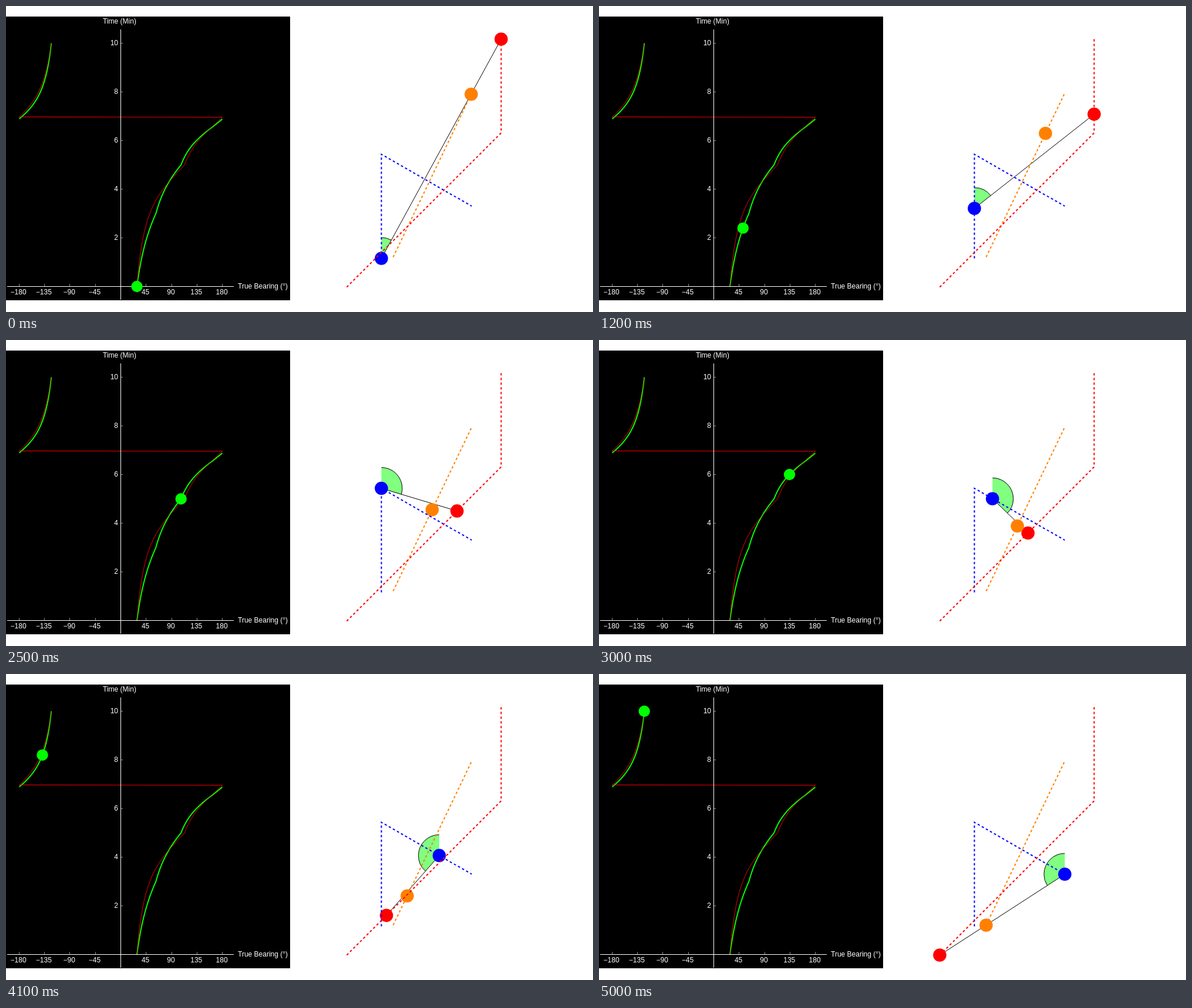
An HTML page with a canvas that plays this animation: 1000x522 px, repeating every 5100 ms.

```html
<!DOCTYPE html>
<html>
<head>
<meta charset="utf-8">
<style>
html, body { margin: 0; width: 100%; height: 100%; overflow: hidden; background: #fff; }
canvas { display: block; }
</style>
</head>
<body>
<canvas width="1000" height="522"></canvas>
<script>
const ctx = document.querySelector('canvas').getContext('2d');
const LOOP = 5100, STEP = 100, TURN = Math.PI * 2;
const RED = '#f00', BLUE = '#00f', ORANGE = '#ff8000', GREEN = '#0f0';

// Tracks: [minute, x, y]
const blue = [[0, 639.5, 430.5], [5, 639.5, 253], [10, 793.5, 341.5]];
const red = [[0, 843.5, 56.5], [3, 843.5, 216.5], [10, 580.5, 479.5]];
const orange = [[0, 792.5, 150.5], [10, 659.5, 428.5]];

function at(track, t) {
  const i = track.findIndex((p, n) => n && t <= p[0]);
  const [a, b] = [track[i - 1], track[i]];
  const k = (t - a[0]) / (b[0] - a[0]);
  return [a[1] + (b[1] - a[1]) * k, a[2] + (b[2] - a[2]) * k];
}

// Clockwise angle from north, in radians
function bearing(track, t) {
  const [x, y] = at(blue, t), [u, v] = at(track, t);
  return Math.atan2(u - x, y - v);
}

const plotX = deg => 195.5 + deg * 0.9625;
const plotY = t => 478.5 - t * 41.5;
const plot = (track, t) => [plotX(bearing(track, t) * 360 / TURN), plotY(t)];

function line(points, color, width = 1, dash = []) {
  ctx.beginPath();
  points.forEach(([x, y]) => ctx.lineTo(x, y));
  ctx.strokeStyle = color;
  ctx.lineWidth = width;
  ctx.setLineDash(dash);
  ctx.stroke();
  ctx.setLineDash([]);
}

function disk([x, y], r, color) {
  ctx.beginPath();
  ctx.arc(x, y, r, 0, TURN);
  ctx.fillStyle = color;
  ctx.fill();
}

function text(s, x, y, align) {
  ctx.font = '12px "Liberation Sans", Arial, sans-serif';
  ctx.fillStyle = '#fff';
  ctx.textAlign = align;
  ctx.fillText(s, x, y);
}

function curve(track, color, width, joinWrap) {
  let points = [];
  for (let i = 0; i <= 1000; i++) {
    const p = plot(track, i / 100);
    if (!joinWrap && points.length && p[0] < points.at(-1)[0] - 100) {
      line(points, color, width);
      points = [];
    }
    points.push(p);
  }
  line(points, color, width);
}

function drawGraph(t) {
  ctx.fillStyle = '#000';
  ctx.fillRect(0, 18, 484, 484);
  curve(orange, '#e00000', 0.9, true);
  curve(red, GREEN, 2, false);
  ctx.globalAlpha = 0.75;
  curve(orange, '#e00000', 0.9, true);
  ctx.globalAlpha = 1;

  for (let d = -180; d <= 180; d += 45) {
    if (!d) continue;
    const x = Math.floor(plotX(d)) + 0.5;
    line([[x, 478], [x, 474]], '#888');
    text(String(d).replace('-', '−'), plotX(d) - 1.2, 492, 'center');
  }
  for (let m = 2; m <= 10; m += 2) {
    line([[196, plotY(m)], [199, plotY(m)]], '#888');
    text(m, 191, plotY(m) + 3.5, 'right');
  }
  line([[2, 478.5], [388, 478.5]], '#fff');
  line([[195.5, 40], [195.5, 501]], '#fff');
  text('Time (Min)', 165, 30, 'left');
  text('True Bearing (°)', 395, 482, 'left');
  disk(plot(red, t), 9.7, GREEN);
}

function drawScene(t) {
  const own = at(blue, t), target = at(red, t);
  const angle = bearing(red, t), north = -TURN / 4;
  const arc = () => ctx.arc(...own, 35.5, north, north + angle, angle < 0);

  ctx.beginPath();
  ctx.moveTo(...own);
  arc();
  ctx.fillStyle = '#80ff80';
  ctx.fill();
  ctx.beginPath();
  arc();
  ctx.strokeStyle = '#000';
  ctx.lineWidth = 1;
  ctx.stroke();
  line([own, target], '#000');

  disk(own, 11.3, BLUE);
  disk(target, 11.3, RED);
  disk(at(orange, t), 11.3, ORANGE);
  [[blue, BLUE], [orange, ORANGE], [red, RED]].forEach(([track, color]) =>
    line(track.map(p => p.slice(1)), color, 2, [4, 4]));
}

function frame(now) {
  const t = Math.floor(now % LOOP / STEP) / 5;
  ctx.fillStyle = '#fff';
  ctx.fillRect(0, 0, 1000, 522);
  drawGraph(t);
  drawScene(t);
}

const start = performance.now();
function tick() {
  frame(performance.now() - start);
  requestAnimationFrame(tick);
}
tick();
</script>
</body>
</html>
```
